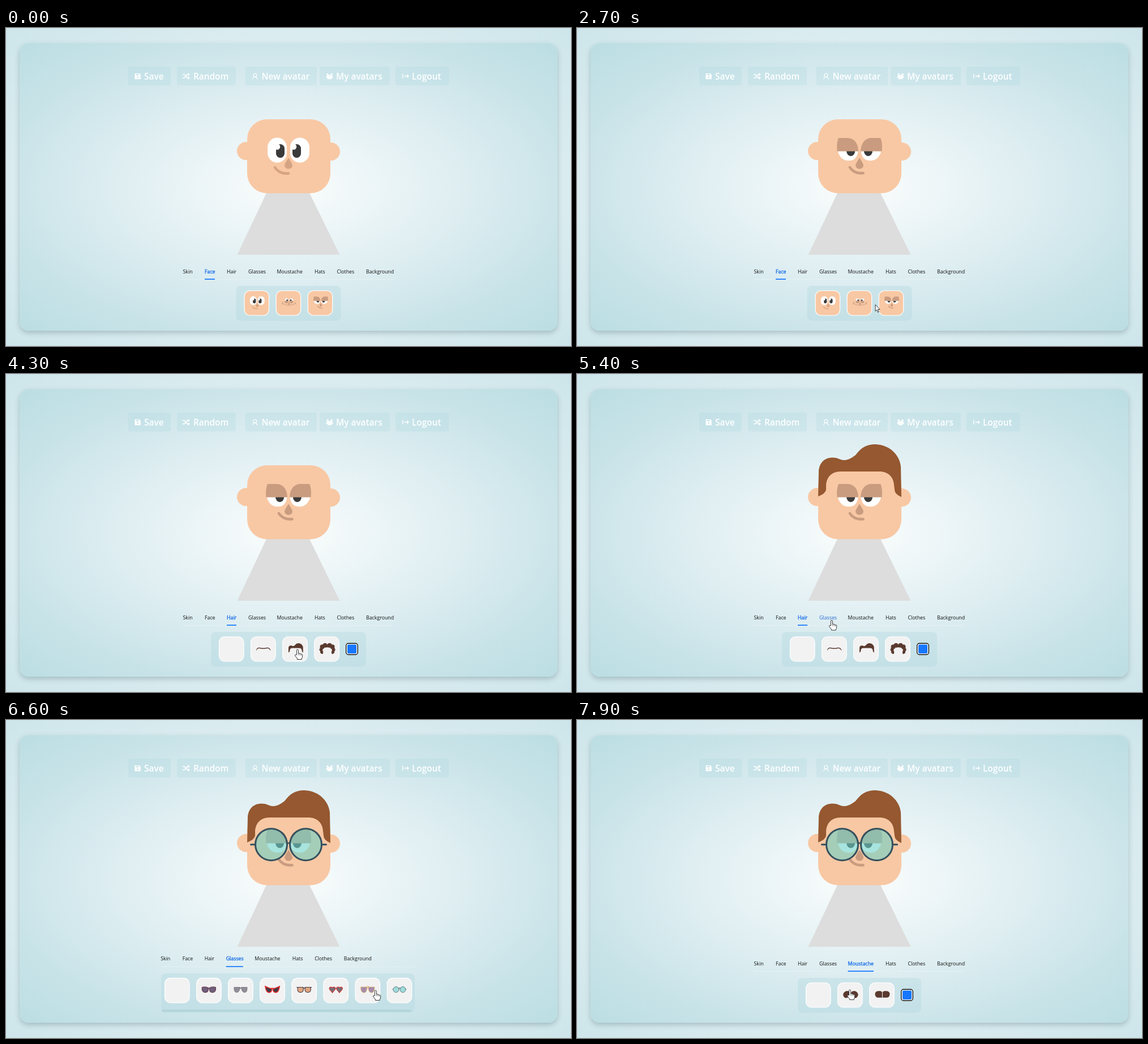
Recreate the animation shown at these times as an HTML page. Size 998 by 561 pixels, loop 8 s.

```html
<!DOCTYPE html>
<html lang="en">
<head>
<meta charset="utf-8">
<title>Avatar builder</title>
<style>
  html, body { margin: 0; width: 100%; height: 100%; overflow: hidden; }
  body { background: radial-gradient(#f5fafb, #cde5ea); }
  #card {
    position: absolute; left: 24px; top: 27px; width: 950px; height: 507px; border-radius: 16px;
    background: radial-gradient(#fbfdfd, #dbecf0 50%, #c8e3e8 76%, #bbdee3);
    box-shadow: 0 4px 10px rgba(40, 70, 80, .26);
  }
  svg { position: absolute; left: 0; top: 0; }
  text { font-family: "Open Sans", "Noto Sans", sans-serif; }
  .button text { font-size: 15.4px; font-weight: 600; fill: #fff; }
  .button rect { fill: #aed6dd; fill-opacity: .28; }
  .tab { font-size: 8.8px; fill: #111; }
  .hover { fill: #2b6bd6; }
  .active { fill: #1a6fe8; stroke: #1a6fe8; stroke-width: .35px; }
</style>
</head>
<body>
<div id="card"></div>
<svg width="998" height="561" viewBox="0 0 998 561">
  <g id="header"></g>
  <g id="scene"></g>
</svg>
<script>
const SKIN = '#f8c8a4', DARK = '#3a3a3a', SHADE = '#c99c80', BROWN = '#5a392e', BLUE = '#1677ff';
const LOOP = 8000, STEP = 100;

const path = (d, fill, more = '') => `<path d="${d}" fill="${fill}" ${more}/>`;
const line = (d, color, width) =>
  path(d, 'none', `stroke="${color}" stroke-width="${width}" stroke-linecap="round" stroke-linejoin="round"`);
const rect = (x, y, w, h, r, fill, more = '') =>
  `<rect x="${x}" y="${y}" width="${w}" height="${h}" rx="${r}" fill="${fill}" ${more}/>`;
const circle = (x, y, r, fill, more = '') => `<circle cx="${x}" cy="${y}" r="${r}" fill="${fill}" ${more}/>`;
const group = (transform, body) => `<g transform="${transform}">${body}</g>`;
const mirror = (axis, body) => body + group(`translate(${2 * axis} 0) scale(-1 1)`, body);
// Maps the point (fx, fy) of a drawing onto (x, y) at the given scale.
const place = (x, y, scale, fx, fy, body) =>
  group(`translate(${x} ${y}) scale(${scale}) translate(${-fx} ${-fy})`, body);

// Header buttons
const icons = [
  path('M227.5 80h8l2.2 2.2v8h-10.2z', '#fff') + path('M229.5 81.2h5v2.3h-5z', '#c9e3e8') + circle(232.6, 87, 1.4, '#c9e3e8'),
  line('M312.5 82h2.5l5 6h3.5M312.5 88h2.5l5-6h3.5M321.8 80.3l2 1.7-2 1.7M321.8 86.3l2 1.7-2 1.7', '#fff', 1.5),
  circle(440, 83.2, 2.9, 'none', 'stroke="#fff" stroke-width="1.1"') + line('M435.8 90q.5-3.5 3-4M441 86.5l3.5 3.5', '#fff', 1.1),
  mirror(571.5, circle(568, 82, 1.9, '#fff') + path('M565.5 88q0-4 3-4 1.5 0 1.5 1.5l-1.5 2.5z', '#fff')) +
    circle(571.5, 84.5, 2, '#fff') + path('M567.5 90.3q0-4 4-4t4 4z', '#fff'),
  line('M700.8 81.5v7M704 85h7M708.8 82.8l2.2 2.2-2.2 2.2', '#fff', 1.3)
];
const buttons = [['Save', 216, 75, 244], ['Random', 302, 104, 331], ['New avatar', 422.5, 126.5, 451.5],
  ['My avatars', 554, 124, 583], ['Logout', 688, 94.5, 717]];
document.getElementById('header').innerHTML = buttons.map(([label, x, w, textX], i) =>
  `<g class="button">${rect(x, 68, w, 33.5, 4, '')}<text x="${textX}" y="90.8">${label}</text></g>${icons[i]}`).join('');

// Avatar parts
const nose = color => path('M499 229Q506 240 506 242A6.8 6.4 0 0 1 492 242Q492 240 499 229z', color);
const wideEye = (x, pupil) => rect(x, 193.5, 34, 44, 17, '#fff') +
  rect(pupil, 205, 15, 24, 7.5, DARK) + circle(pupil + 2, 209.5, 5.2, '#fff');
const faces = [
  wideEye(462, 477) + wideEye(502, 506) + nose('#d6a482') + line('M475 246Q483 258 499 256.5', '#d6a482', 4.6),
  mirror(499, path('M465.3 218A15.2 19.5 0 0 1 495.7 218z', '#fff') + circle(485.5, 214.3, 6.8, DARK) +
    path('M465 219Q480 215 496 218.5A15.5 18.8 0 0 1 465 219z', SHADE) +
    line('M468 205Q480 192 493 205', '#d39479', 1)) +
    nose(SHADE) + line('M447 238Q498 268 550 238', SHADE, 4.2) +
    line('M451 227Q454 239 444.5 244.5M546.5 229Q545 240 554 244.5', SHADE, 4.2),
  mirror(499, path('M460.5 216.5H496.5Q495 234 480 234T460.5 216.5z', '#fff') +
    path('M476 217H491.2A7.6 9 0 0 1 476 217z', DARK) +
    path('M459.5 217.5Q458 202 462 194H479Q496 196 497 217.5z', SHADE)) +
    nose(SHADE) + line('M482 246Q490 257.5 505.5 256', SHADE, 4.6)
];
const HAIR = 'M426 216L427 170C430 148 447 146 458 148C470 153 476 155 492 143C500 133 508 124 527 124' +
  'C555 125 571 146 572 164L573 217Q561 212 561 204L560 196C559 180 548 172 534 172H466' +
  'C448 172 440 184 440 198V204Q439 211 426 216z';
const glasses = mirror(499,
  circle(468.5, 219.7, 28, 'rgba(110,210,200,.6)', 'stroke="#34505d" stroke-width="3"') +
  line('M432.5 219.7h7', '#34505d', 3)) + line('M496.5 218Q499 216 501.5 218', '#34505d', 2.6);
const figure = path('M460 291H536L589.5 400H408.5z', '#ddd') + circle(424, 217, 16, SKIN) + circle(574, 218, 16, SKIN) +
  rect(426, 161, 147, 130.5, 35, SKIN);

// Thumbnail pictures, drawn around (0, 0) where the tile's centre is
const specs = (lens, bridge) => group('translate(0 -1.5)', mirror(0, lens) + line('M-1.5-2.5h3', bridge, 1.2));
const lens = (d, fill, frame, width = 1) => path(d, fill, `stroke="${frame}" stroke-width="${width}"`);
const thumbs = {
  Face: [
    place(1, -4.5, .35, 499, 215, faces[0]),
    place(1, -4, .23, 499, 218, faces[1]),
    place(1, -11.5, .325, 499, 194, faces[2])
  ],
  Hair: [
    '',
    path('M-12.5 3.5Q-12.5-2.5-7-2.8Q0-.5 7-2.8Q13-2.5 13 3.5Q11-1 7-1.2Q0 .7-7-1.2Q-11-1-12.5 3.5z', BROWN),
    place(1.3, -10.3, .177, 499, 124, path(HAIR, BROWN)),
    mirror(1, [[-9, 5, 2.6], [-10, 1, 3], [-8, -4, 4], [-3, -6.5, 4], [-8.3, 7, 1.8]]
      .map(c => circle(...c, BROWN)).join('')) + rect(-3, -8, 8, 5, 2, BROWN)
  ],
  Glasses: [
    '',
    specs(lens('M1-3Q6-6 12-4Q13 5 6.5 5T1-3z', '#70607a', '#6a3d55', 1.2), '#6a3d55'),
    specs(lens('M1-4H11.5Q12 5 7 5T1-4z', '#918d97', '#77747c', .9), '#77747c'),
    specs(lens('M1-1.5Q6-2 12.5-5.5Q11 5 6 5T1-1.5z', '#3b3d42', '#d92b2f', 1.8), '#d92b2f'),
    specs(lens('M1.5-4H11.5V1Q11 5 6.5 5T1.5 1z', '#e0a67f', '#453c48', 1.1) + line('M11.5-4h1.3', '#453c48', 1.3), '#453c48'),
    specs(lens('M6.2 5.5L1.2-.5Q.5-4.5 4-4.5Q6-4.5 6.3-2.8Q7-4.5 9-4.5Q12.5-4 11.2-.5z', '#71727a', '#c8393b', 1.3), '#c8393b'),
    specs(lens('M1-4.5H12Q12.5 5 7 5.5T1-4.5z', '#a68ba8', '#dbb078'), '#dbb078') + line('M-2-7h4', '#dbb078', 1),
    specs(circle(6, 0, 5, '#9edbd9', 'stroke="#456570" stroke-width=".8"') + line('M11-.5h1', '#456570', .8), '#456570')
  ],
  Moustache: [
    '',
    mirror(1, path('M0-5Q-4-9-9-6Q-13-3-12 1Q-10 6-6 5Q-2 4 0-1z', BROWN)),
    mirror(1, path('M.5-5.5Q-2-8-6-7Q-12-7-12-1.5Q-12 4.5-6 4.5H.5z', BROWN))
  ]
};

// Tab bar and option panels
const tabs = [['Skin', 312.5, 17.5], ['Face', 351, 18], ['Hair', 390, 17], ['Glasses', 428, 30], ['Moustache', 478.5, 45.5],
  ['Hats', 545, 19], ['Clothes', 584.5, 31], ['Background', 636, 49.5]];
const panels = {
  Face: { x: 406.5, w: 185, first: 420.5, dx: 0, dy: 0 },
  Hair: { x: 362, w: 274, first: 376, dx: 0, dy: 0, swatch: 611 },
  Glasses: { x: 274, w: 448, first: 280, dx: -39.3, dy: -8.2, wide: true },
  Moustache: { x: 390, w: 218, first: 404, dx: 0, dy: 0, swatch: 583 }
};
const TILE = 44.5, PITCH = 56.1, TILE_Y = 463;

const tabAt = (p, x, y) => tabs.findIndex(([, tx, w]) =>
  x >= tx + p.dx - 2 && x <= tx + p.dx + w + 2 && y > 415 + p.dy && y < 445 + p.dy);
const overTile = (p, count, x, y) => {
  const i = Math.floor((x - p.first) / PITCH);
  return i >= 0 && i < count && x - p.first - i * PITCH < TILE && y > TILE_Y + p.dy && y < TILE_Y + p.dy + TILE;
};

function drawMenu(name, hovered) {
  const p = panels[name];
  const end = p.wide ? 722 : 685.5;
  let out = rect(312.5 + p.dx, 443 + p.dy, end - 312.5 - p.dx, .8, 0, 'rgba(255,255,255,.35)');
  tabs.forEach(([label, x, w], i) => {
    const state = label === name ? 'active' : i === hovered ? 'hover' : '';
    out += `<text class="tab ${state}" x="${x + p.dx}" y="${432.6 + p.dy}">${label}</text>`;
    if (label === name) out += rect(x + p.dx, 442.3 + p.dy, w, 1.7, 0, BLUE);
  });
  out += rect(p.x, 455 + p.dy, p.w, p.wide ? 69 : 61.5, 8, 'rgba(174,214,221,.36)');
  if (p.wide) out += rect(275, 510.7, 440.5, 4.6, 2.3, '#b3d5db');
  const fill = name === 'Face' ? SKIN : '#f2f2f2';
  thumbs[name].forEach((art, i) => {
    const x = p.first + i * PITCH, y = TILE_Y + p.dy;
    out += rect(x + .5, y + .5, TILE - 1, TILE - 1, 10, fill, 'stroke="#fff" stroke-width="1.2"') +
      group(`translate(${x + TILE / 2} ${y + TILE / 2})`, art);
  });
  if (p.swatch) out += rect(p.swatch - 10.3, 475.2, 20.6, 19.8, 4, '#fff', 'stroke="#111" stroke-width="1.4"') +
    rect(p.swatch - 8, 477.3, 16, 15.6, 2, BLUE);
  return out;
}

// Pointer: time, x, y
const moves = [[300, 797, 530], [1100, 498, 488], [1400, 498, 488], [2300, 550, 490], [2600, 550, 490], [2700, 527, 488],
  [3300, 392, 434], [3500, 392, 434], [4300, 515, 486], [4500, 515, 486], [5350, 450, 434.5], [5550, 450, 434.5],
  [6200, 707, 486], [6300, 708, 486], [6600, 653, 477], [7100, 466, 428], [7200, 466, 428], [7900, 482, 476]];
function pointerAt(t) {
  const i = moves.findIndex(m => m[0] > t);
  if (i < 0) return moves[moves.length - 1].slice(1);
  const [t0, x0, y0] = moves[i - 1], [t1, x1, y1] = moves[i];
  const u = (t - t0) / (t1 - t0), e = u * u * (3 - 2 * u);
  return [x0 + (x1 - x0) * e, y0 + (y1 - y0) * e];
}
const outline = 'stroke="#222" stroke-width=".9" stroke-linejoin="round"';
const hand = path('M-1.6 9.5V1.5a1.5 1.5 0 0 1 3 0V6.8q1.7-.9 2.6.6q1.6-.8 2.4.8q2-.5 2.2 1.2V12q0 2.5-1.4 4v1.5H-.5V16' +
  'L-4.4 11q-.6-2 1.2-1.9z', '#fff', outline) + line('M1.4 7v3M4 7.8v2.5M6.4 8.5v2', '#222', .6);
const arrow = path('M0 0V11.5L2.7 9.1L4.6 13.6L6.4 12.8L4.5 8.5H8z', '#fff', outline);

function render(t) {
  const name = t < 3500 ? 'Face' : t < 5600 ? 'Hair' : t < 7200 ? 'Glasses' : 'Moustache';
  const face = t < 1400 ? 0 : t < 2700 ? 1 : 2;
  let hovered = -1, pointer = '';
  if (t >= 300) {
    const [x, y] = pointerAt(t), p = panels[name];
    hovered = tabAt(p, x, y);
    const active = hovered >= 0 || overTile(p, thumbs[name].length, x, y);
    pointer = group(`translate(${x} ${y})`, active ? hand : arrow);
  }
  document.getElementById('scene').innerHTML = figure + faces[face] +
    (t >= 4500 ? path(HAIR, '#955830') : '') + (t >= 6300 ? glasses : '') +
    drawMenu(name, hovered) + pointer;
}

let shown = -1;
function tick() {
  const t = Math.floor(performance.now() % LOOP / STEP) * STEP;
  if (t !== shown) render(shown = t);
  requestAnimationFrame(tick);
}
tick();
</script>
</body>
</html>
```
